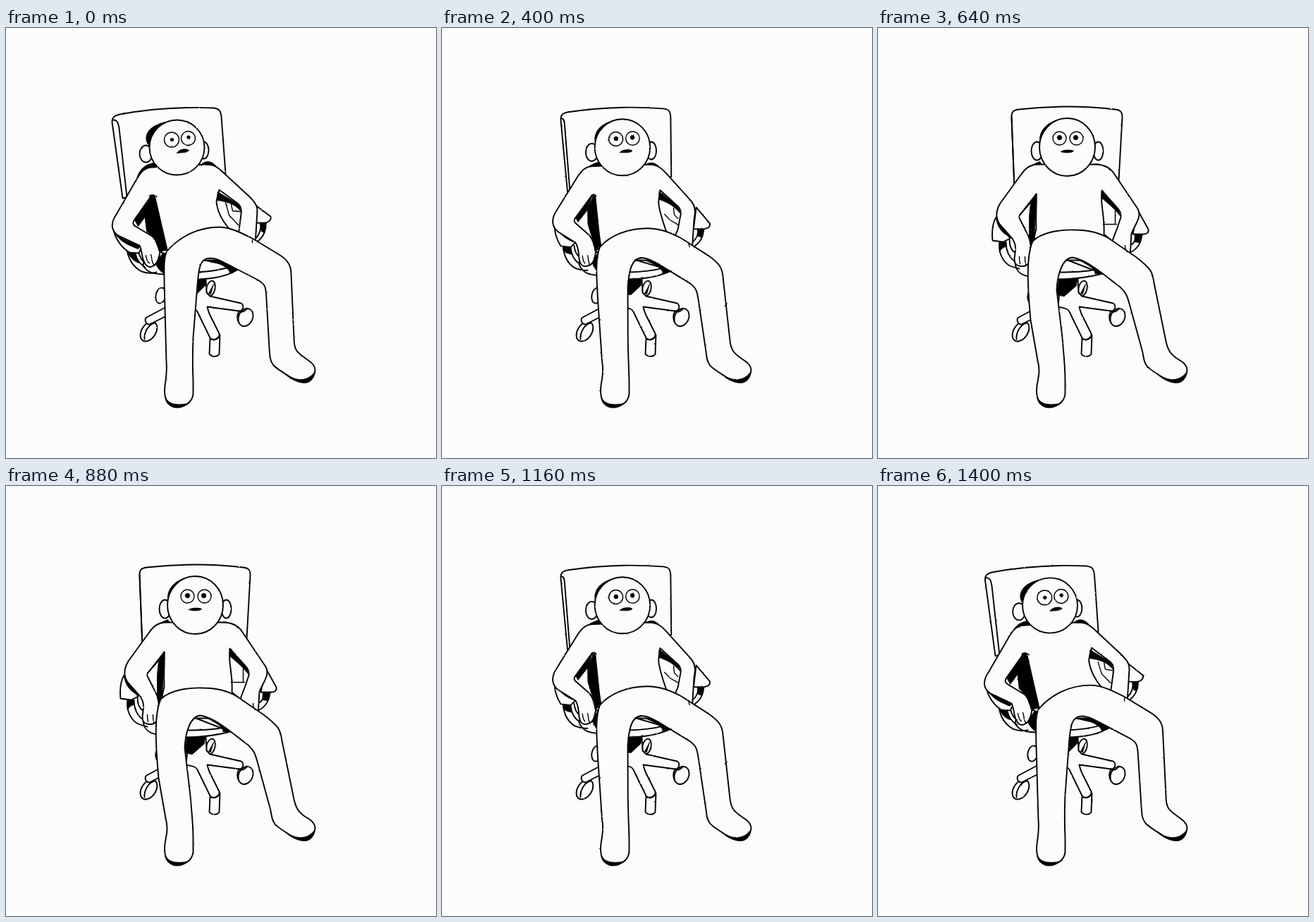
Recreate the animation shown at these times as an HTML page. Size 610 by 610 pixels, loop 1520 ms.

```html
<!DOCTYPE html>
<html lang="en">
<head>
<meta charset="utf-8">
<title>Swivel chair</title>
<style>
  html, body { margin: 0; width: 100%; height: 100%; overflow: hidden; background: #fcfcfc; }
  svg { display: block; width: 100vw; height: 100vh; }
  path { stroke: #000; stroke-width: 1.9; stroke-linejoin: round; stroke-linecap: round; }
  .body { fill: #fcfcfc; }
  .line { fill: none; }
  .thin { fill: none; stroke-width: 1.4; }
  .ink { fill: #000; stroke-width: .8; }
</style>
</head>
<body>
<svg viewBox="0 0 610 610">
  <defs>
    <filter id="rough" filterUnits="userSpaceOnUse" x="0" y="0" width="610" height="610" color-interpolation-filters="sRGB">
      <feTurbulence id="grain" type="fractalNoise" baseFrequency=".3" numOctaves="2" seed="1"/>
      <feDisplacementMap in="SourceGraphic" scale="1.7" xChannelSelector="R" yChannelSelector="G"/>
    </filter>
  </defs>
  <g filter="url(#rough)"><g id="art" transform="translate(-.5 -.5)"></g></g>
</svg>
<script>
const art = document.getElementById('art');
const grain = document.getElementById('grain');
const parts = [];

// A part blends from its left-turned path to its right-turned one; lag > 1 makes it follow late.
function part(cls, left, right = left, lag = 1) {
  const el = document.createElementNS('http://www.w3.org/2000/svg', 'path');
  el.setAttribute('class', cls);
  art.appendChild(el);
  parts.push({ el, left, lag, ends: right.match(/-?[\d.]+/g).map(Number) });
}
const oval = (x, y, rx, ry = rx, tilt = 0) => {
  const a = tilt * Math.PI / 180, dx = rx * Math.cos(a), dy = rx * Math.sin(a);
  return `M${x - dx} ${y - dy} a${rx} ${ry} ${tilt} 1 0 ${2 * dx} ${2 * dy} a${rx} ${ry} ${tilt} 1 0 ${-2 * dx} ${-2 * dy}Z`;
};
const ARM = 1.3, REST = .8, FACE = .85;

// Wheels and star base
part('body', oval(220, 380, 7, 11, 12));
part('body', oval(291, 370, 6, 11, 12));
part('ink', 'M288 377 L295 364 L291 378Z');
part('body', oval(203, 431, 10, 15, 33));
part('body', 'M232 394 L200 411 C196 414 199 421 204 421 L232 407Z');
part('line', 'M211 419 C203 421 196 432 197 442');
part('body', 'M290 381 L334 391 C339 394 337 402 331 402 L286 396 C287 400 288 404 290 408 L303 434 C304 441 294 445 290 440 L272 403 C270 398 264 398 256 396 L258 374 L284 357 L285 376Z');
part('body', 'M290 441 L289 463 C293 468 301 467 303 463 L304 436 C302 442 295 445 290 441Z');
part('body', oval(340.5, 411, 10, 13, 25));
part('line', 'M331 402 C334 405 341 402 342 398 M331 402 C328 408 328 414 331 419');
part('ink', 'M267 377 L270 358 L284 357 L283 366 L272 377Z', 'M254 379 L257 357 L283 356 L282 366 L265 381Z');

// Back rest
part('body',
  'M166 242 L151 134 C151 127 154 125 162 123 C205 115 250 112 295 114 C303 115 305 118 306 126 L312 207Z',
  'M194 230 L190 126 C190 119 193 117 200 116 C245 111 295 111 337 116 C345 117 347 120 347 127 L342 217Z');
part('line', 'M153 131 C159 131 160 137 161 143 L172 240', 'M190 126 C190 126 190 126 190 128 L194 228');

// Seat
part('body', 'M195 338 C203 350 214 349 226 350 L229 310 L200 310Z', 'M195 334 C196 347 206 352 216 353 L222 310 L200 310Z');
part('ink', 'M212 334 L229 312 L229 351 C224 349 218 346 212 334Z', 'M215 331 L219 318 L217 343 C216 342 215 337 215 331Z');
part('body', 'M266 357 C295 357 318 352 332 341 L274 328Z', 'M254 357 C280 357 300 354 319 349 L265 328Z');
part('line', 'M270 347 C290 346 308 343 320 339', 'M257 347 C275 347 290 347 304 344');
part('ink', 'M280 327 C300 328 316 334 333 342 L318 349 C319 342 305 334 280 327Z',
  'M270 324 C285 327 305 337 321 349 L308 349 C311 344 295 332 270 324Z');

// Arm rests
part('line', 'M172 315 C174 327 180 339 193 346 C202 349 208 349 214 347', 'M173 304 C171 317 176 330 186 337 C190 339 195 341 201 342', REST);
part('line', 'M184 321 C186 329 190 335 198 340', 'M182 304 C182 315 186 326 194 331', REST);
part('line', 'M189 320 C191 327 193 330 197 333', 'M187 300 C187 309 189 316 195 319', REST);
part('ink', 'M172 315 L184 320 L189 334 C181 331 175 325 172 315Z', 'M173 305 L182 304 L181 311 C178 312 175 314 173 318Z', REST);
part('body', 'M153 286 C155 299 165 313 176 319 L189 320 L193 310 L160 293Z', 'M168 269 C162 279 162 291 163 302 L178 304 L188 299 L174 280Z', REST);
part('ink', 'M152 286 C155 295 174 304 191 309 L188 314 C172 308 159 302 152 286Z', 'M168 269 C170 277 176 285 188 297 L184 295 C177 291 169 283 168 269Z', REST);
part('line', 'M369 276 C370 289 364 300 352 307', 'M375 293 C374 306 369 314 358 319');
part('line', 'M362 276 C363 287 360 294 354 300', 'M366 293 C367 301 364 306 358 309');
part('ink', 'M361 277 L370 276 L367 291 L363 289Z', 'M365 293 L376 293 L371 305 L365 304Z');
part('body', 'M352 250 L376 268 C377 273 373 276 368 277 L352 277Z', 'M369 259 L384 286 C385 291 382 293 376 293 L362 293Z', REST);

// Shadow behind the shoulders
part('ink', 'M186 214 C190 200 198 194 210 192 L217 199 L192 208Z', 'M213 200 C217 196 222 193 230 190 L234 196 L216 200Z', .6);
part('ink', 'M274 198 C283 186 293 189 300 198 L284 199Z', 'M299 198 C306 193 312 192 317 195 L304 198Z');

// Torso with both arms
part('body',
  'M209 198 C197 198 192 205 187 213 L157 265 C148 278 150 289 160 295 L190 309 C194 318 193 326 196 331 C198 337 203 342 209 338 C214 336 217 330 219 318 L250 330 L316 330 L354 307 L357 260 C357 251 352 246 345 239 L306 203 C298 196 293 194 284 194Z',
  'M228 194 C214 194 208 202 203 209 L174 249 C166 262 168 272 174 280 L190 298 C197 307 196 314 194 327 C194 333 195 337 201 338 C210 340 216 338 218 318 L250 330 L316 330 L358 325 L360 292 C366 278 375 268 369 257 L336 208 C330 198 320 194 308 194Z', ARM);
part('thin', 'M199 323 C200 328 200 332 204 334 M206 322 C208 327 207 333 210 336', 'M201 325 C201 328 201 331 202 335 M209 325 C209 328 209 332 210 336', ARM);

// Gaps between arms and torso
part('body',
  'M207 238 L183 272 C179 278 181 280 186 283 L208 296 C214 302 217 308 218 317 L229 315 L213 246 C212 240 210 239 207 238Z',
  'M225 236 L203 264 C200 267 200 269 202 272 L212 292 C217 300 217 308 218 317 L221 303 L225 285 C224 260 226 245 225 236Z', ARM);
part('ink', 'M207 239 L197 264 L200 289 L211 299 L218 317 L229 315 L212 242Z', 'M225 237 L217 249 L215 268 L215 295 L218 315 L222 303 L225 239Z', .9);
part('ink', 'M207 240 L183 273 L188 282 L199 267Z', 'M225 237 L203 264 L203 265 L217 249Z', ARM);
part('line', 'M204 239 C208 236 211 238 214 240', 'M224 237 C225 235 225 236 225 238');
part('body',
  'M303 230 L330 250 C334 254 335 258 334 264 L331 288 C329 292 328 294 326 297 L316 284 C306 272 300 260 299 247 C300 240 302 236 303 230Z',
  'M318 231 L342 258 C346 263 346 267 344 272 L340 284 C337 292 335 296 333 303 L321 293 C322 275 319 262 318 250 C317 243 318 236 318 231Z');
part('thin', 'M312 248 L317 266 L330 280 M320 251 L322 260 L333 261', 'M320 279 L330 279 L339 279 M337 260 L337 270 L337 279', REST);
part('ink', 'M301 233 L331 251 L333 260 C327 252 317 247 300 245Z', 'M318 232 L342 258 L344 267 C336 257 328 250 318 242Z');

// Legs, then soles
part('body',
  'M228 318 C246 297 272 283 303 283 C318 283 334 291 350 299 L388 322 C401 330 405 338 405 350 L409 440 C409 458 414 461 424 468 L432 474 C441 481 440 488 436 496 C430 506 416 502 406 497 C396 491 386 485 380 479 C374 471 375 465 374 455 L370 385 C369 370 370 365 358 358 L325 341 C310 333 300 327 290 327 C274 327 274 345 272 365 L266 440 C265 465 265 480 266 500 L266 520 C264 534 252 538 243 537 C228 535 224 525 226 508 C228 495 229 485 228 475 L225 360 C225 340 224 330 228 318Z',
  'M220 303 C230 292 255 286 280 287 C300 287 315 291 328 299 L366 325 C388 342 390 346 392 362 L408 440 C411 458 416 463 424 469 L432 474 C441 481 440 488 436 496 C430 506 416 502 406 497 C396 491 386 485 382 480 C376 472 378 467 375 457 L358 395 C354 380 352 375 344 368 L318 348 C303 337 290 328 276 326 C262 327 255 350 254 372 L262 440 C264 465 266 480 266 500 L266 520 C264 534 252 538 243 537 C228 535 224 525 226 508 C228 495 231 487 227 472 L217 415 C213 370 210 325 220 303Z', 1.05);
part('thin', 'M350 301 C350 303 350 304 350 305', 'M351 309 C351 313 352 316 354 318');
part('ink', 'M226 524 C230 533 240 537 259 533 C252 539 246 540 239 539 C230 536 227 531 226 524Z');
part('ink', 'M397 492 C412 501 427 503 438 489 C437 499 431 505 422 504 C413 503 405 499 397 492Z');

// Head
part('ink', 'M205 169 C195 160 196 141 226 134 L230 150Z', 'M232 167 C226 157 232 136 258 130 L258 150Z', .7);
part('body', oval(199, 179, 9, 12), oval(226, 175, 8, 13), FACE);
part('body', oval(281, 174, 7, 12), oval(313, 175, 7, 13), FACE);
part('body', oval(243, 170, 39, 39), oval(269, 169.5, 39.5, 41), FACE);
part('thin', oval(235.5, 159, 10.5), oval(258, 157, 9.5), FACE);
part('thin', oval(259, 157, 10), oval(282, 157, 9.5), FACE);
part('ink', oval(236, 159, 2.3), oval(258, 156, 3.2), FACE);
part('ink', oval(259.5, 155.5, 2.3), oval(281, 156, 3.2), FACE);
part('ink', 'M243 178 C246 172 256 171 260 174 C257 178 250 177 243 178Z', 'M260 176 C263 173 275 173 278 175 C276 178 264 178 260 176Z', .7);

// [start in ms, turn of the chair, grain seed]
const steps = [
  [0, 0, 1], [120, -.03, 2], [240, .1, 3], [320, .25, 4], [400, .46, 5], [480, .7, 6],
  [560, .9, 7], [640, 1, 8], [760, 1.02, 9], [880, 1, 8], [1000, .9, 7], [1080, .7, 6],
  [1160, .46, 5], [1240, .25, 4], [1320, .1, 3], [1400, .035, 10]
];
const LOOP = 1520;
let shown = -1;

function pose(turn, seed) {
  for (const { el, left, ends, lag } of parts) {
    const k = turn > 0 ? turn ** lag : turn;
    let i = 0;
    el.setAttribute('d', left.replace(/-?[\d.]+/g, n => +(+n + (ends[i++] - n) * k).toFixed(2)));
  }
  grain.setAttribute('seed', seed);
}
function tick() {
  const t = performance.now() % LOOP;
  const now = steps.findLastIndex(s => s[0] <= t);
  if (now !== shown) {
    shown = now;
    pose(steps[now][1], steps[now][2]);
  }
  requestAnimationFrame(tick);
}
tick();
</script>
</body>
</html>
```
